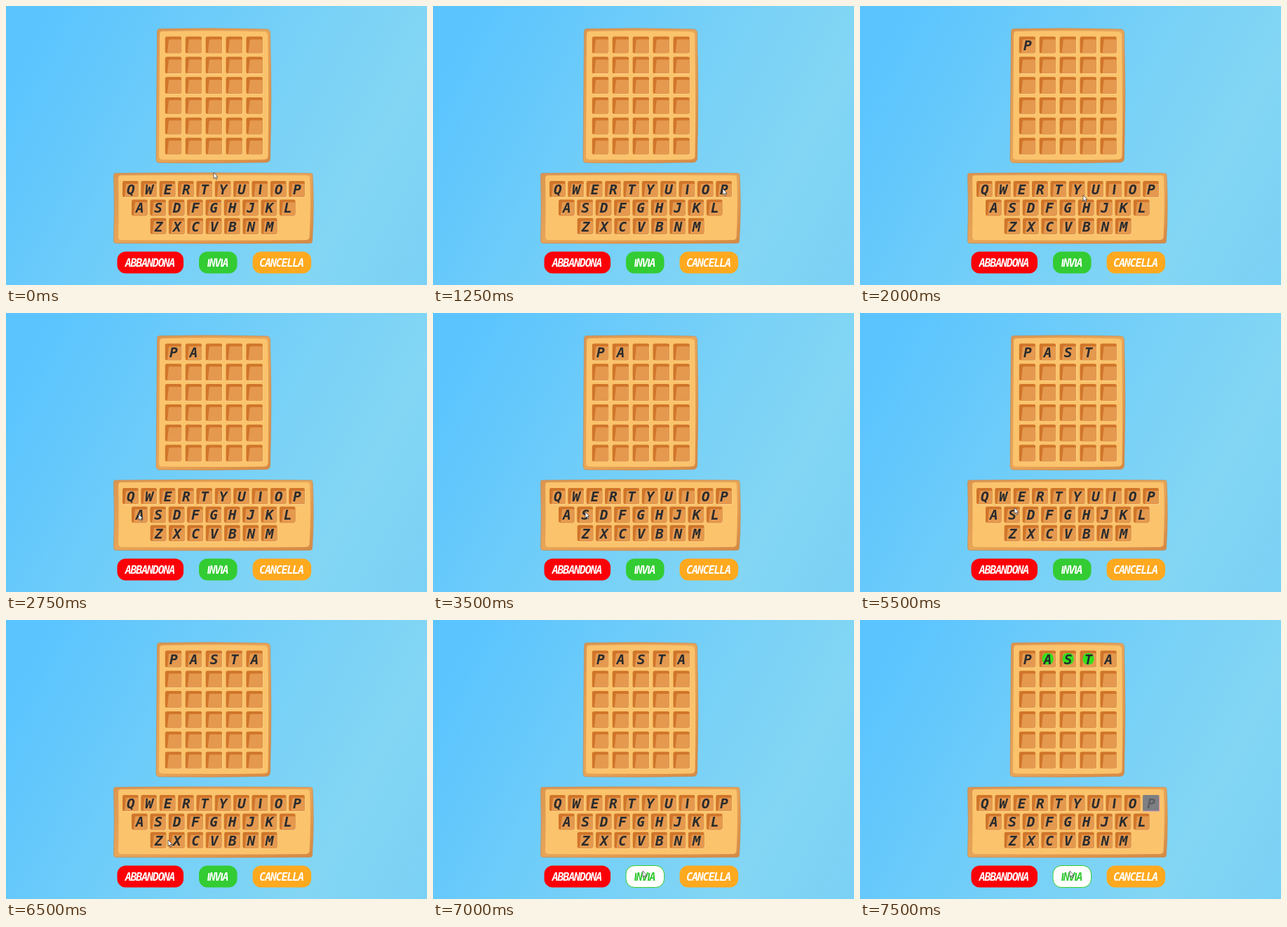
Write an HTML page that moves like this. It is 600 by 397 pixels and loops after 8000 ms.

```html
<!DOCTYPE html>
<html lang="it">
<head>
<meta charset="utf-8">
<title>Waffle di parole</title>
<style>
  html, body { margin: 0; width: 100%; height: 100%; overflow: hidden; }
  body { background: linear-gradient(118deg, #5bc4fe 8%, #74cff8 48%, #83d6f4 78%, #7bd1f5); }
  svg { display: block; width: 100%; height: 100%; }
  text { font-family: "DejaVu Sans Mono", monospace; font-weight: 700; font-style: italic; text-anchor: middle; }
  .bar { font-family: Lato, sans-serif; font-weight: 800; }
  .letter { font-size: 19.5px; fill: #292b2e; }
  .label { font-size: 15px; letter-spacing: -1.2px; fill: #fff; }
  .hover .label { fill: #33c933; }
  .hover rect { stroke: #33cc33; }

  /* One loop is 32 ticks of 250 ms; every change lands on a tick. */
  .cursor { animation: move 8s infinite step-end; }
  @keyframes move {
    0%      { transform: translate(296px, 237px); }
    3.125%  { transform: translate(296px, 237px); animation-timing-function: steps(4); }
    15.625% { transform: translate(413px, 260px); }
    18.75%  { transform: translate(413px, 260px); animation-timing-function: steps(2); }
    25%     { transform: translate(318px, 269px); animation-timing-function: steps(2); }
    31.25%  { transform: translate(189px, 286px); }
    37.5%   { transform: translate(189px, 286px); animation-timing-function: steps(2); }
    43.75%  { transform: translate(217px, 283px); }
    50%     { transform: translate(217px, 283px); animation-timing-function: steps(2); }
    56.25%  { transform: translate(282px, 259px); }
    62.5%   { transform: translate(282px, 259px); animation-timing-function: steps(3); }
    71.875% { transform: translate(189px, 286px); }
    78.125% { transform: translate(189px, 286px); }
    81.25%  { transform: translate(231px, 313px); animation-timing-function: steps(2); }
    87.5%, to { transform: translate(299px, 357px); }
  }
  .t0 { animation: type0 8s infinite step-end; }
  .t1 { animation: type1 8s infinite step-end; }
  .t2 { animation: type2 8s infinite step-end; }
  .t3 { animation: type3 8s infinite step-end; }
  .t4 { animation: type4 8s infinite step-end; }
  .hover { animation: hover 8s infinite step-end; }
  .result { animation: result 8s infinite step-end; }
  @keyframes type0 { 0% { opacity: 0 } 18.75%, to { opacity: 1 } }
  @keyframes type1 { 0% { opacity: 0 } 34.375%, to { opacity: 1 } }
  @keyframes type2 { 0% { opacity: 0 } 50%, to { opacity: 1 } }
  @keyframes type3 { 0% { opacity: 0 } 62.5%, to { opacity: 1 } }
  @keyframes type4 { 0% { opacity: 0 } 75%, to { opacity: 1 } }
  @keyframes hover { 0% { opacity: 0 } 87.5%, to { opacity: 1 } }
  @keyframes result { 0% { opacity: 0 } 90.625%, to { opacity: 1 } }
</style>
</head>
<body>
<svg viewBox="0 0 600 397" preserveAspectRatio="none">
  <defs>
    <g id="cell">
      <path d="M1.500 24H21.500Q23.500 24 23.500 22V2" fill="none" stroke="#ffd78b" stroke-width="1.3"/>
      <rect width="23.400" height="23.700" rx="2.500" fill="#d0752a"/>
      <path d="M5 5.500Q5 4 6.500 4H23.400V21.700Q23.400 23.700 21.400 23.700H3Z" fill="#e4994f"/>
    </g>
    <linearGradient id="crust" x2="1" y2="1">
      <stop offset="0" stop-color="#dc9650"/>
      <stop offset=".5" stop-color="#e8a558"/>
      <stop offset="1" stop-color="#d68a44"/>
    </linearGradient>
  </defs>

  <g stroke="#c98243" stroke-width=".6" fill="url(#crust)">
    <path d="M219 32.500Q296 31 371 33Q376 33 376.500 38Q379 128 376.500 217Q376 222 371 222.500Q296 224 219 223Q214 223 214 218L215.500 37Q215.500 32.500 219 32.500Z"/>
    <path d="M156 238Q296 236.500 434 238Q437 238 437 241Q439.500 290 436.500 334Q436.500 337.500 433 337.500Q296 338.500 157 337.500Q153.500 337.500 153.500 334Q155 288 153.500 241Q153.500 238 156 238Z"/>
  </g>
  <g fill="#fac36c">
    <path d="M223 36Q296 34.500 368 36.500Q372.500 37 373 41Q375 128 373.500 214Q373 218 368 218.500Q296 219.500 222 218.500Q217.500 218 218 213L219 41Q219 36 223 36Z"/>
    <path d="M164 241Q296 240 429 241Q433 241.500 433 245Q435 288 432.500 329Q432 332.500 428 333Q296 334 164 333Q160 332.500 160 328Q161 288 160 245Q160 241 164 241Z"/>
  </g>

  <g id="board"></g>
  <g id="keys"></g>
  <g class="result">
    <rect x="403" y="249" width="23.500" height="23" rx="2" fill="#7d7f83"/>
    <path d="M403 272H426.500V252" fill="none" stroke="#d594b4"/>
    <text class="letter" x="415" y="268" style="fill:#5d5f63">P</text>
  </g>
  <g id="marks" class="result"></g>
  <g id="word"></g>
  <g id="buttons"></g>
  <path class="cursor" d="M0 0V8.600L2 6.800L3.500 10L4.800 9.400L3.400 6.300H6Z" fill="#fff" stroke="#333" stroke-width=".7"/>
</svg>
<script>
  const add = (id, markup) => document.getElementById(id).insertAdjacentHTML("beforeend", markup);
  // The monospaced I has serifs; set it as a plain bar.
  const plain = s => s.replace(/I/g, '<tspan class="bar">I</tspan>');
  const letter = (ch, x, y, cls = "") => `<text class="letter ${cls}" x="${x}" y="${y}">${plain(ch)}</text>`;
  const colX = c => 226.8 + c * 28.9;

  for (let r = 0; r < 6; r++)
    for (let c = 0; c < 5; c++)
      add("board", `<use href="#cell" x="${colX(c)}" y="${43.5 + r * 28.8}"/>`);

  [["QWERTYUIOP", 166], ["ASDFGHJKL", 179], ["ZXCVBNM", 205.7]].forEach(([row, left], r) => {
    const y = 249 + r * 26.4;
    [...row].forEach((ch, i) => {
      const x = left + i * 26.35;
      add("keys", `<use href="#cell" transform="translate(${x} ${y}) scale(.97)"/>` + letter(ch, x + 11.8, y + 19));
    });
  });

  [..."PASTA"].forEach((ch, c) => add("word", letter(ch, colX(c) + 12, 62.5, "t" + c)));
  for (const c of [1, 2, 3])
    add("marks", `<rect x="${colX(c) + 4}" y="47" width="16" height="16.500" rx="7" fill="#35e01c"/>`);

  function button(text, x, w, fill, cls = "") {
    add("buttons", `<g class="${cls}"><rect x="${x}" y="349.500" width="${w}" height="31" rx="12" fill="${fill}"/>
      <text class="label" x="${x + w / 2 - .8}" y="370.500">${plain(text)}</text></g>`);
  }
  button("ABBANDONA", 158.5, 94.5, "#fb0007");
  button("INVIA", 275, 54.5, "#33cc33");
  button("CANCELLA", 351.5, 83.5, "#ffa91f");
  button("INVIA", 275, 54.5, "#fff", "hover");
</script>
</body>
</html>
```
